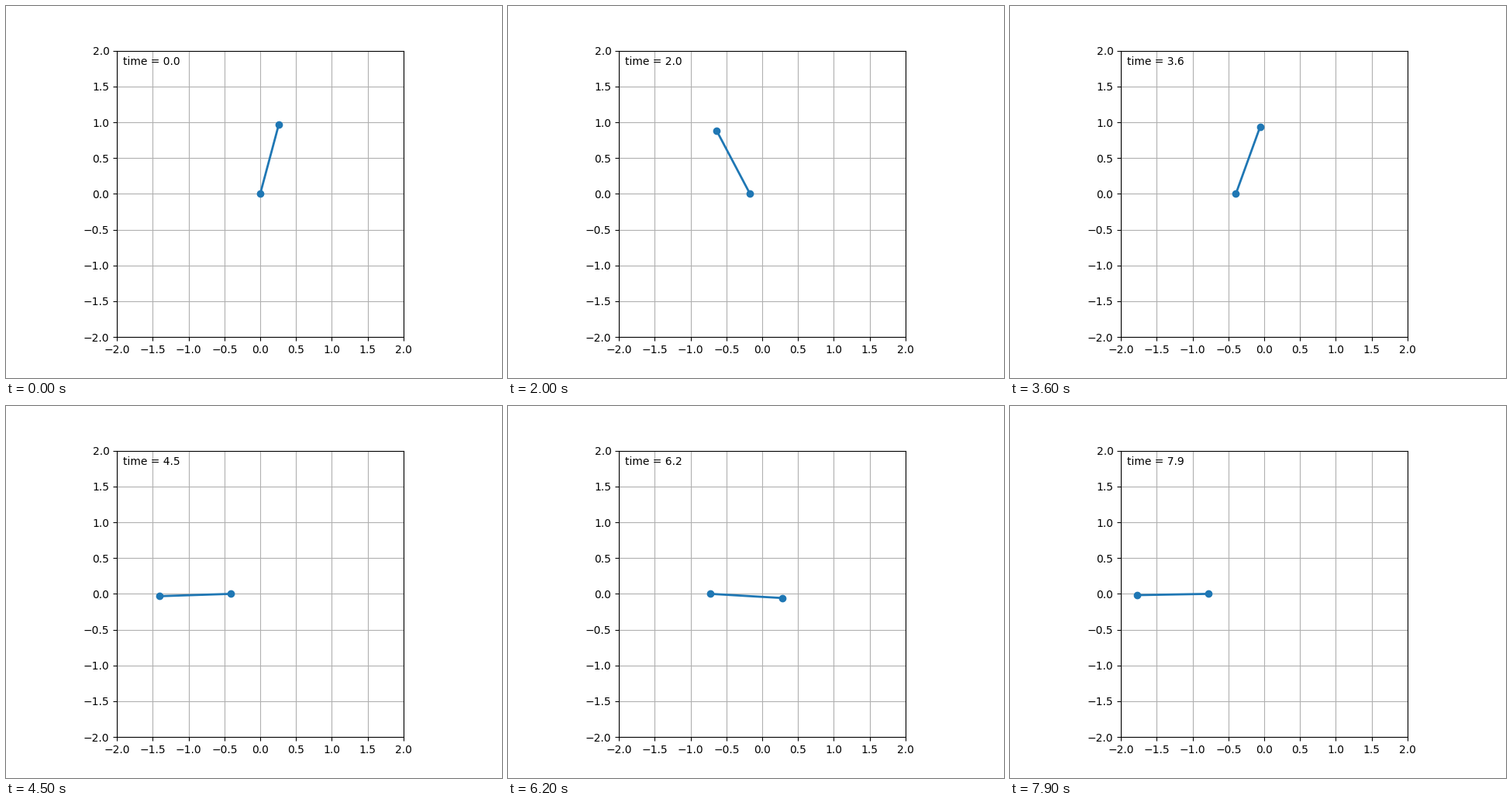
Animation, 640 px wide and 480 px high, one loop 8 s. Source, as a matplotlib script:

```python
import numpy as np
import matplotlib.pyplot as plt
from matplotlib.animation import FuncAnimation

FRAMES, DT, SUBSTEPS = 80, 0.1, 50
G = 9.8
REACH = 2 / 3        # effective length of a uniform rod of length 1
COUPLING = 0.0645    # recoil of the cart per unit of pole swing
DRAG = 0.000654
DRIFT = -0.1085      # steady drift of the centre of mass
START = np.array([np.radians(15), 0.176])    # angle from upright, angular velocity


def slope(state):
    th, w = state
    s, c = np.sin(th), np.cos(th)
    acc = (G * s - COUPLING * s * c * w * w - DRAG * w) / (REACH - COUPLING * c * c)
    return np.array([w, acc])


def rk4(state, h):
    a = slope(state)
    b = slope(state + h / 2 * a)
    c = slope(state + h / 2 * b)
    d = slope(state + h * c)
    return state + h / 6 * (a + 2 * b + 2 * c + d)


def swing():
    state, angles = START, []
    for _ in range(FRAMES):
        angles.append(state[0])
        for _ in range(SUBSTEPS):
            state = rk4(state, DT / SUBSTEPS)
    return np.array(angles)


theta = swing()
time = DT * np.arange(FRAMES)
cart = DRIFT * time + COUPLING * (np.sin(theta[0]) - np.sin(theta))
tip_x, tip_y = cart + np.sin(theta), np.cos(theta)

fig = plt.figure(figsize=(6.4, 4.8), dpi=100)
ax = fig.add_subplot(111, autoscale_on=False, xlim=(-2, 2), ylim=(-2, 2))
ax.set_aspect("equal")
ticks = np.arange(-2, 2.1, 0.5)
ax.set_xticks(ticks)
ax.set_yticks(ticks)
ax.grid()

pole, = ax.plot([], [], "o-", lw=2)
label = ax.text(0.02, 0.95, "", transform=ax.transAxes)


def draw(i):
    pole.set_data([cart[i], tip_x[i]], [0, tip_y[i]])
    label.set_text(f"time = {time[i]:.1f}")
    return pole, label


anim = FuncAnimation(fig, draw, frames=FRAMES, interval=100, repeat=True, repeat_delay=0)
plt.show()
```
